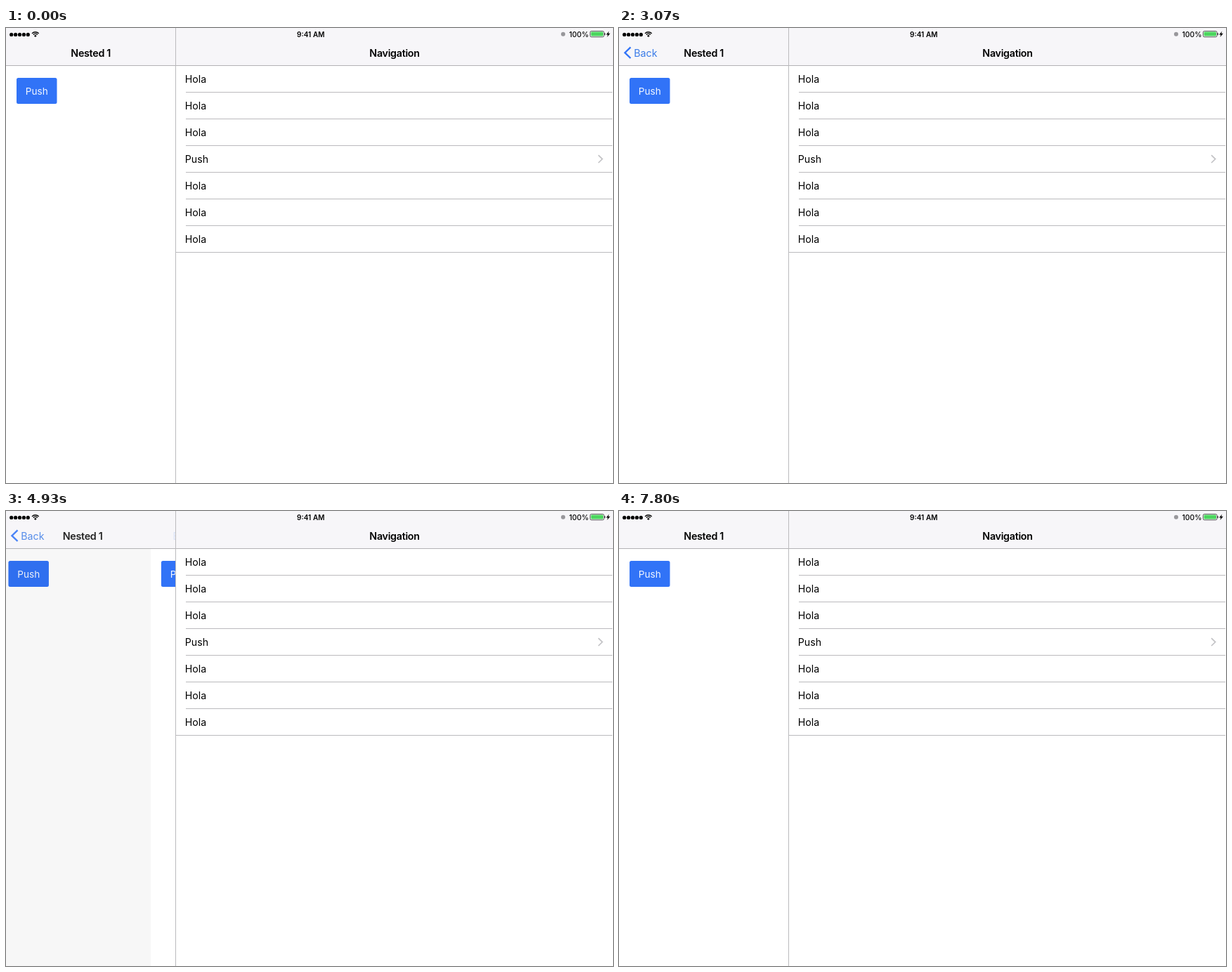
An HTML page with a canvas for the animation above (8000 ms loop, 864 by 648 pixels).

```html
<!DOCTYPE html>
<html lang="en">
<head>
<meta charset="utf-8">
<title>Nested navigation</title>
<style>
  html, body { margin: 0; width: 100%; height: 100%; overflow: hidden; background: #fff; }
  canvas { display: block; }
</style>
</head>
<body>
<canvas id="stage" width="864" height="648"></canvas>
<script>
const ctx = document.getElementById('stage').getContext('2d');
const LOOP = 8000, FRAME = 1000 / 15, PANE = 241;
const BLUE = '#3173f7', LINE = '#bbbabd', BAR = '#f7f6f9';

const root = { title: 'Nested 1' };
const second = { title: 'Nested 1', back: true, fixedBack: true };
const third = { title: 'Nested 3', back: true };
const moves = [
  { start: 2201, length: 632, lower: root, upper: second, push: true },
  { start: 3405, length: 733, lower: second, upper: third, push: true },
  { start: 4660, length: 774, lower: second, upper: third },
  { start: 7100, length: 700, lower: root, upper: second }
];

// cubic-bezier(.36, .66, .04, 1)
function ease(x) {
  if (x <= 0) return 0;
  if (x >= 1) return 1;
  const curve = (s, a, b) => 3 * (1 - s) ** 2 * s * a + 3 * (1 - s) * s * s * b + s ** 3;
  let low = 0, high = 1;
  for (let i = 0; i < 24; i++) {
    const mid = (low + high) / 2;
    if (curve(mid, .36, .04) < x) low = mid; else high = mid;
  }
  return curve(low, .66, 1);
}

function rect(x, y, w, h, color) {
  ctx.fillStyle = color;
  ctx.fillRect(x, y, w, h);
}

function rounded(x, y, w, h, r, color) {
  ctx.fillStyle = color;
  ctx.beginPath();
  ctx.roundRect(x, y, w, h, r);
  ctx.fill();
}

function dot(x, y, r, color) {
  ctx.fillStyle = color;
  ctx.beginPath();
  ctx.arc(x, y, r, 0, Math.PI * 2);
  ctx.fill();
}

function text(str, x, y, size, { weight = 400, color = '#000', align = 'left', spacing = 0 } = {}) {
  ctx.font = `${weight} ${size}px Inter, sans-serif`;
  ctx.letterSpacing = spacing + 'px';
  ctx.textAlign = align;
  ctx.fillStyle = color;
  ctx.fillText(str, x, y);
}

function stroke(path, color, width) {
  ctx.strokeStyle = color;
  ctx.lineWidth = width;
  ctx.stroke(new Path2D(path));
}

function heading(str, x) {
  text(str, x, 40.5, 14.3, { weight: 600, align: 'center', spacing: -.3 });
}

function page(x, shade) {
  rect(x, 54, PANE, 594, '#fff');
  rounded(x + 15, 71, 57.5, 37, 2.5, BLUE);
  text('Push', x + 43.8, 94.8, 13.6, { color: '#f4f8ff', align: 'center' });
  if (shade) rect(x, 54, PANE, 594, `rgba(0,0,0,${shade})`);
}

function barItems(view, titleShift, backShift, alpha, entering) {
  ctx.globalAlpha = alpha;
  heading(view.title, 120.7 + titleShift);
  if (view.back) {
    if (entering && view.fixedBack) ctx.globalAlpha = Math.min(1, alpha * 1.7);
    text('Back', 21.3 + backShift, 40.5, 14.2, { color: '#3a7be8' });
    ctx.globalAlpha = entering && view.fixedBack ? Math.max(0, (alpha - .6) / .4) : alpha;
    stroke('M16.5 27.4L8.4 35.2L16.5 43', BLUE, 2.3);
  }
  ctx.globalAlpha = 1;
}

function leftPane(time) {
  const move = moves.filter(m => m.start <= time).pop() || moves[0];
  const progress = ease((time - move.start) / move.length);
  const cover = move.push ? progress : 1 - progress;
  const lowerX = -.33 * PANE * cover, upperX = PANE * (1 - cover);
  const travel = !move.push ? 253 : move.upper.fixedBack ? 0 : 84;

  ctx.save();
  ctx.beginPath();
  ctx.rect(0, 0, PANE, 648);
  ctx.clip();
  page(lowerX, .22 * cover);
  page(upperX, 0);
  rect(0, 0, PANE, 53, BAR);
  rect(0, 53, PANE, 1, '#b3b2b5');
  barItems(move.lower, lowerX, 0, 1 - cover);
  barItems(move.upper, upperX, travel * (1 - cover), cover, move.push);
  ctx.restore();
}

function rightPane() {
  rect(242, 0, 622, 53, BAR);
  rect(242, 53, 622, 1, '#b3b2b5');
  heading('Navigation', 553);
  ['Hola', 'Hola', 'Hola', 'Push', 'Hola', 'Hola', 'Hola'].forEach((label, i, all) => {
    const y = 54 + i * 38, left = i === all.length - 1 ? 242 : 256;
    text(label, 254.8, y + 24, 14.2);
    rect(left, y + 37, 863 - left, 1, LINE);
  });
  stroke('M843.2 181.2L848.8 186.6L843.2 192', '#c3c3c6', 1.7);
  rect(PANE, 0, 1, 648, LINE);
}

function statusBar() {
  for (let i = 0; i < 5; i++) dot(7.7 + i * 5.9, 9.4, 2.6, '#000');
  for (const r of [6.6, 4.2]) {
    ctx.strokeStyle = '#000';
    ctx.lineWidth = 1.4;
    ctx.beginPath();
    ctx.arc(41.8, 12.4, r, -Math.PI * .76, -Math.PI * .24);
    ctx.stroke();
  }
  dot(41.8, 11.3, 1.4, '#000');
  text('9:41 AM', 433.8, 12.8, 10.1, { weight: 600, align: 'center' });
  dot(793, 8.7, 3, '#98979b');
  text('100%', 801.4, 12.8, 10.4, { weight: 500 });
  ctx.strokeStyle = '#333';
  ctx.lineWidth = .8;
  ctx.beginPath();
  ctx.roundRect(831.4, 4.4, 19.8, 8.4, 2);
  ctx.stroke();
  rounded(832.6, 5.6, 17.4, 6, 1, '#4cd75f');
  rounded(851.8, 7, 1.2, 3.2, .6, '#333');
  ctx.fillStyle = '#000';
  ctx.fill(new Path2D('M858.4 4.4L854.2 9.4H856.7L855.6 13L860 7.8H857.3Z'));
}

function draw(now) {
  const time = Math.floor(now % LOOP / FRAME + .06) * FRAME;
  rect(0, 0, 864, 648, '#fff');
  leftPane(time);
  rightPane();
  statusBar();
  requestAnimationFrame(draw);
}
requestAnimationFrame(draw);
</script>
</body>
</html>
```
